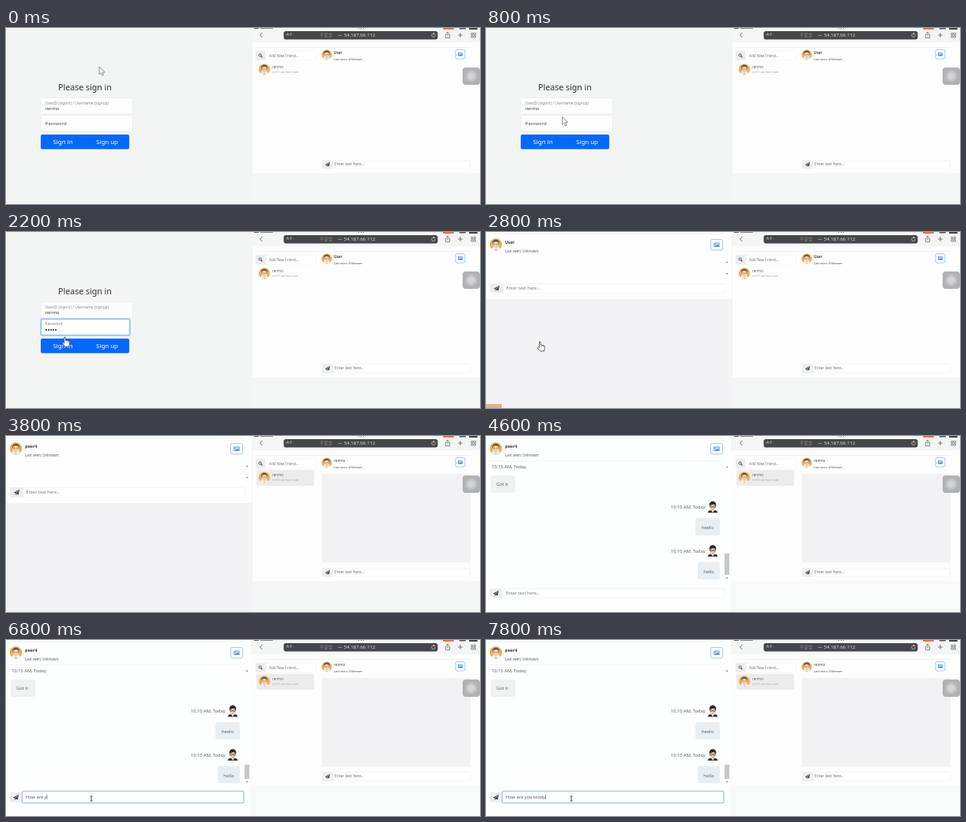
An HTML page with a canvas that plays this animation: 600x223 px, repeating every 8 s.

```html
<!DOCTYPE html>
<html lang="en">
<head>
<meta charset="utf-8">
<title>Chat on two devices</title>
<style>
html, body { margin: 0; width: 100%; height: 100%; overflow: hidden; background: #f4f5f5; }
canvas { display: block; width: 600px; height: 223px; }
</style>
</head>
<body>
<canvas id="stage" width="600" height="223"></canvas>
<script>
const ctx = document.getElementById('stage').getContext('2d');
const LOOP = 8000, STEP = 200;
const FONT = '"Noto Sans", "Open Sans", sans-serif';
const CJK = '"Noto Sans CJK SC", "Noto Sans CJK", sans-serif';
const INK = '#3a3d40', GREY = '#74787c', FOCUS = '#84b9f0';
const FRIEND = 'renmo', PEER = 'peer4';
const MESSAGE = 'How are you today';

function rect(x, y, w, h, fill, r = 0) {
  ctx.fillStyle = fill;
  ctx.beginPath();
  ctx.roundRect(x, y, w, h, r);
  ctx.fill();
}

function frame(x, y, w, h, color, r = 1, width = 1) {
  ctx.strokeStyle = color;
  ctx.lineWidth = width;
  ctx.beginPath();
  ctx.roundRect(x, y, w, h, r);
  ctx.stroke();
}

function disc(x, y, r, fill) {
  ctx.fillStyle = fill;
  ctx.beginPath();
  ctx.arc(x, y, r, 0, Math.PI * 2);
  ctx.fill();
}

function arc(x, y, r, color, width, from = 0, to = Math.PI * 2) {
  ctx.strokeStyle = color;
  ctx.lineWidth = width;
  ctx.beginPath();
  ctx.arc(x, y, r, from, to);
  ctx.stroke();
}

function shape(points, fill) {
  ctx.fillStyle = fill;
  ctx.beginPath();
  points.forEach(([x, y]) => ctx.lineTo(x, y));
  ctx.closePath();
  ctx.fill();
}

function line(points, color, width = 1) {
  ctx.strokeStyle = color;
  ctx.lineWidth = width;
  ctx.beginPath();
  points.forEach(([x, y]) => ctx.lineTo(x, y));
  ctx.stroke();
}

// y is the middle of the lowercase letters
function text(s, x, y, size, color = INK, align = 'left', weight = 400, family = FONT) {
  ctx.font = `${weight} ${size}px ${family}`;
  ctx.textAlign = align;
  ctx.textBaseline = 'alphabetic';
  ctx.fillStyle = color;
  ctx.fillText(s, x, y + size * 0.36);
  return ctx.measureText(s).width;
}

function at(x, y, scale, draw) {
  ctx.save();
  ctx.translate(x, y);
  ctx.scale(scale, scale);
  draw();
  ctx.restore();
}

function friendFace(x, y, r) {
  at(x, y, r / 10, () => {
    disc(0, 0, 10, '#f8ab3c');
    ctx.save();
    ctx.beginPath();
    ctx.arc(0, 0, 10, 0, Math.PI * 2);
    ctx.clip();
    rect(-8, 5, 16, 8, '#edf2f5', 4);
    shape([[-1.5, 6], [1.5, 6], [0, 10]], '#6b9dc4');
    disc(0, -2.6, 5.9, '#6d5a49');
    rect(-5.2, -4.6, 10.4, 12, '#fbe3cd', 4.5);
    ctx.restore();
    frame(-4.5, -1.8, 3.6, 3, '#76675c', 1, 0.8);
    frame(0.9, -1.8, 3.6, 3, '#76675c', 1, 0.8);
    line([[-2, 4.2], [2, 4.2]], '#b9806a', 0.8);
  });
}

function ownFace(x, y) {
  at(x, y, 0.72, () => {
    shape([[-9, 10], [-7, 6.5], [0, 4.5], [7, 6.5], [9, 10]], '#2b2e31');
    shape([[-3, 5], [3, 5], [0, 10]], '#f4f4f4');
    disc(0, -4, 6, '#2a2827');
    rect(-4.8, -5.5, 9.6, 12.5, '#f4d8c0', 4.5);
    shape([[-5, -3], [-4, -7], [4, -7], [5, -3], [2, -5]], '#2a2827');
    frame(-4.5, -2, 3.7, 2.8, '#333', 1, 1);
    frame(0.8, -2, 3.7, 2.8, '#333', 1, 1);
    line([[-1.8, 4], [1.8, 4]], '#9a6a58', 0.9);
  });
}

function plane(x, y, s) {
  at(x, y, s, () => {
    shape([[-4, 0.5], [4, -4], [2.5, 3.5], [0, 2.2], [-1.5, 4], [-1.6, 1.6]], '#44484c');
    line([[-1.3, 1.6], [3, -3]], '#e9ebee', 0.7);
  });
}

function pictureButton(x, y, w, h) {
  rect(x, y, w, h, '#fdfeff', 2);
  frame(x + 0.5, y + 0.5, w - 1, h - 1, '#8fbcf7', 2, 0.8);
  at(x + w / 2, y + h / 2, w / 16, () => {
    rect(-3.6, -2.8, 7.2, 5.6, '#3d8aee', 0.8);
    rect(-2.8, -2, 5.6, 4, '#d8e8fc');
    disc(-1.6, -0.9, 0.7, '#3d8aee');
    shape([[-2.8, 2], [-1, 0.4], [0, 1], [1.3, -0.9], [2.8, 2]], '#3d8aee');
  });
}

function entry(x, y, boxW, h, right, size) {
  rect(x + boxW, y, right - x - boxW, h, '#fff');
  frame(x + boxW, y + 0.5, right - x - boxW, h - 1, '#f0f1f2', 1, 0.7);
  rect(x, y, boxW, h, '#eceef0', 1);
  plane(x + boxW / 2, y + h / 2, size / 6.6);
}

function arrow(x, y) {
  const p = [[0, 0], [0, 10], [2.4, 7.8], [4, 11.4], [5.6, 10.7], [4, 7.3], [7.2, 7]]
    .map(([a, b]) => [x + a, y + b]);
  shape(p, '#fff');
  line([...p, p[0]], '#777', 0.8);
}

function beam(x, y) {
  line([[x, y - 3], [x, y + 3]], '#444', 0.9);
  for (const d of [-3, 3]) line([[x - 1.6, y + d], [x + 1.6, y + d]], '#444', 0.9);
}

function hand(x, y) {
  at(x, y, 1, () => {
    const p = [[-2.5, -6], [-1, -6], [-0.7, -2], [3.8, -1], [4.5, 1], [3.4, 6], [-1.5, 6], [-5, 1.5], [-4, 0.5], [-2.5, 1.6]];
    shape(p, '#fff');
    line([...p, p[0]], '#555', 0.9);
    for (const dx of [0.8, 2.4]) line([[dx, -1], [dx, 1]], '#777', 0.6);
  });
}

// Eased position between two moments
function glide(t, t0, t1, from, to) {
  const k = Math.min(1, Math.max(0, (t - t0) / (t1 - t0)));
  const e = k * k * (3 - 2 * k);
  return from.map((v, i) => v + (to[i] - v) * e);
}

function signIn(t) {
  const focused = t >= 1000;
  const dots = t < 1400 ? 0 : Math.min(5, 1 + (t - 1400) / STEP);
  rect(0, 0, 312, 223, '#f3f4f4');
  text('Please sign in', 100, 75.5, 10.6, '#303336', 'center');
  rect(44, 88, 117, 21, '#fdfdfd', 1);
  frame(44, 88.5, 116.5, 20.5, '#e6e8e9', 1, 0.7);
  text('UserID (signin) / Username (signup)', 49.5, 95, 4.8, '#85898c');
  text(FRIEND, 49.5, 102.3, 5.8, INK);
  rect(44, 110, 116, 21, '#fdfdfd', 1);
  if (focused) {
    frame(44, 110, 113, 21, '#b5d4fa', 2, 2.2);
    frame(44.5, 110.5, 112, 20, FOCUS, 2, 0.8);
    text('Password', 49.5, 116.5, 4.9, '#85898c');
    for (let i = 0; i < dots; i++) disc(51 + i * 3, 124, 1.1, '#333');
    if (t < 2200) line([[50 + dots * 3, 121.5], [50 + dots * 3, 126.5]], '#444', 0.6);
  } else {
    frame(44, 110.5, 116.5, 20.5, '#e6e8e9', 1, 0.7);
    text('Password', 49.5, 120.6, 6, '#4e5255');
  }
  rect(44, 135, 112, 18.5, '#0568fa', 2);
  text('Sign in', 72, 144, 7.9, '#fff', 'center');
  text('Sign up', 128, 144, 7.9, '#fff', 'center');

  if (t < 1000) arrow(...glide(t, 0, 1000, [118, 49], [94, 120]));
  else if (t < 2000) beam(94, 123.5);
  else hand(...glide(t, 1800, 2400, [94, 123], [70, 145]));
}

function chatHeader(name) {
  friendFace(12.5, 16, 7.7);
  text(name, 24, 13, 5.4, '#34373a', 'left', 600);
  text('Last seen: Unknown', 24, 24, 4.5, '#55595c');
  pictureButton(284, 9, 16, 14.5);
}

function scrollTicks(top, bottom) {
  shape([[303.5, top + 1], [306.5, top + 1], [305, top - 1]], '#8a8c8e');
  shape([[303.5, bottom - 1], [306.5, bottom - 1], [305, bottom + 1]], '#8a8c8e');
}

function emptyChat(t) {
  rect(0, 0, 312, 223, '#f3f3f5');
  rect(0, 0, 311, 85, '#fefefe');
  line([[0, 2.5], [302, 2.5]], '#eeeff0', 0.7);
  chatHeader(t < 3400 ? 'User' : PEER);
  scrollTicks(38, 53);
  entry(5, 65, 17, 12.5, 302, 6);
  text('Enter text here...', 25.5, 71, 5.55, GREY);
  if (t < 3000) {
    rect(0, 218, 20, 5, '#deb187');
    hand(70, 145);
  } else if (t < 3600) {
    arrow(...glide(t, 2800, 3600, [68, 139], [40, 225]));
  }
}

function ownMessage(y, s, left) {
  text('10:10 AM, Today', 234, y, 5.7, '#5b5f62');
  ownFace(287, y);
  rect(left, y + 14, 296 - left, 22, '#e8eff3', 3);
  text(s, (left + 296) / 2, y + 26, 5.8, '#5a6064', 'center');
}

function chat(t) {
  rect(0, 0, 310, 223, '#fdfefe');
  line([[0, 2.5], [302, 2.5]], '#eeeff0', 0.7);
  chatHeader(PEER);
  line([[5, 31.5], [302, 31.5]], '#f0f1f2', 0.7);
  text('10:15 AM, Today', 7.3, 39, 5.7, '#5b5f62');
  rect(6, 50, 31, 22, '#f0f1f3', 3);
  text('Got it', 13, 61, 5.8, '#5a6064');
  ownMessage(90, 'heelo', 265);
  ownMessage(145.5, 'hello', 268);
  scrollTicks(39, 180);
  const thumb = t < 5000 ? 149 : 158;
  rect(302, thumb, 6, 176 - thumb, '#c5c7c9');

  const focused = t >= 5400;
  entry(5, 193, 15, 12.5, 302, 6);
  if (focused) {
    rect(20, 191.5, 281, 15, '#fff', 1);
    frame(20.5, 191.5, 280.5, 15, '#d6e7f8', 1, 1.6);
    frame(20.5, 191.5, 280.5, 15, '#8dbfe9', 1, 0.8);
  }
  const count = t < 5600 ? 0 : Math.min(MESSAGE.length, 1 + Math.floor((t - 5600) / STEP * 16 / 11));
  if (count) {
    const w = text(MESSAGE.slice(0, count), 25, 199, 5.7, '#55595c');
    line([[25.4 + w, 196], [25.4 + w, 202]], '#444', 0.6);
  } else {
    text('Enter text here...', 25.2, 199, 5.55, GREY);
  }
  if (t >= 5000 && !focused) arrow(...glide(t, 4800, 5400, [150, 150], [108, 198]));
  if (focused) beam(108, 201);
}

function browserBar() {
  const icon = '#5c5f62';
  rect(311, 0, 289, 18, '#f4f5f5');
  rect(314, 0, 6, 1, '#666');
  rect(322, 0, 16, 1, '#888');
  for (const x of [446, 449, 452]) rect(x, 0, 1, 1, '#777');
  rect(553, 0, 14, 2, '#ea7058', 1);
  rect(574, 0, 8, 1.5, '#555');
  rect(586, 0, 11, 2, '#444', 1);
  line([[324.3, 6], [321.5, 9], [324.3, 12]], icon, 0.9);
  rect(351.5, 4, 195, 10.5, '#454649', 3);
  text('大小', 354.5, 9, 4, '#e8e8e8', 'left', 400, CJK);
  text('不安全', 397, 9, 5.5, '#8a8c8f', 'left', 400, CJK);
  text('— 54.187.66.112', 420, 9, 6.1, '#d8d9da');
  arc(541, 9.3, 2.2, '#ddd', 0.7, -0.3, 5);
  shape([[541, 5.8], [543.2, 7], [541, 8.2]], '#ddd');
  line([[557.8, 8], [556.3, 8], [556.3, 12.5], [561.7, 12.5], [561.7, 8], [560.2, 8]], icon, 0.7);
  line([[559, 10.5], [559, 5.2]], icon, 0.7);
  line([[557.3, 6.8], [559, 5.2], [560.7, 6.8]], icon, 0.7);
  line([[572, 9], [578, 9]], icon, 0.8);
  line([[575, 6], [575, 12]], icon, 0.8);
  for (const x of [588.8, 592.2]) for (const y of [6.3, 9.7]) frame(x, y, 2.3, 2.3, icon, 0.4, 0.7);
}

function tablet(t) {
  const open = t >= 3400;
  const left = t < 2600 ? 312 : 310;
  rect(left, 0, 600 - left, 223, '#f4f5f5');
  rect(left, 18, 600 - left, 166, '#fdfdfd');
  if (t >= 4200) rect(left, 184, 600 - left, 39, '#f8f9f9');
  browserBar();
  line([[316, 24.5], [588, 24.5]], '#ededee', 0.7);

  rect(328, 29, 64, 12, '#fff');
  frame(328, 29.5, 64, 11.5, '#f0f1f2', 1, 0.6);
  rect(316, 29, 12.5, 12, '#ebedef', 1);
  arc(321.6, 34.4, 1.6, '#44484c', 0.9);
  line([[322.8, 35.6], [324.5, 37.3]], '#44484c', 1.1);
  text('Add New Friend...', 333, 35, 4.55, GREY);

  if (open) rect(317, 43, 73, 20, '#ececed', 2);
  friendFace(327, 52.5, 7);
  text(FRIEND, 337, 49, 4.5, '#66696c');
  text('● Hi! I am here now', 337, 56, 3.6, '#a0a2a5');

  friendFace(406, 34, 6.5);
  text(open ? FRIEND : 'User', 415, 31, 4.6, '#45484b', 'left', open ? 400 : 600);
  text('Last seen: Unknown', 415, 40, 3.8, '#4c5053');
  pictureButton(568.5, 27, 13, 12.5);
  if (open) rect(400, 48, 188, 112.5, '#f2f2f4');
  entry(400, 167, 14, 11.5, 587, 5.2);
  text('Enter text here...', 416, 172.7, 4.85, '#6b6f72');

  rect(578, 50, 22, 22, '#b0b2b4', 4);
  disc(589, 61, 7.5, '#bcbec0');
  disc(589, 61, 5.6, '#c7c9ca');
  disc(589, 61, 3.8, '#d3d4d5');
}

function draw(now) {
  const t = Math.floor((now % LOOP) / STEP) * STEP;
  ctx.clearRect(0, 0, 600, 223);
  tablet(t);
  if (t < 2600) signIn(t);
  else if (t < 4200) emptyChat(t);
  else chat(t);
}

const start = performance.now();
function tick() {
  draw(performance.now() - start);
  requestAnimationFrame(tick);
}
tick();
</script>
</body>
</html>
```
